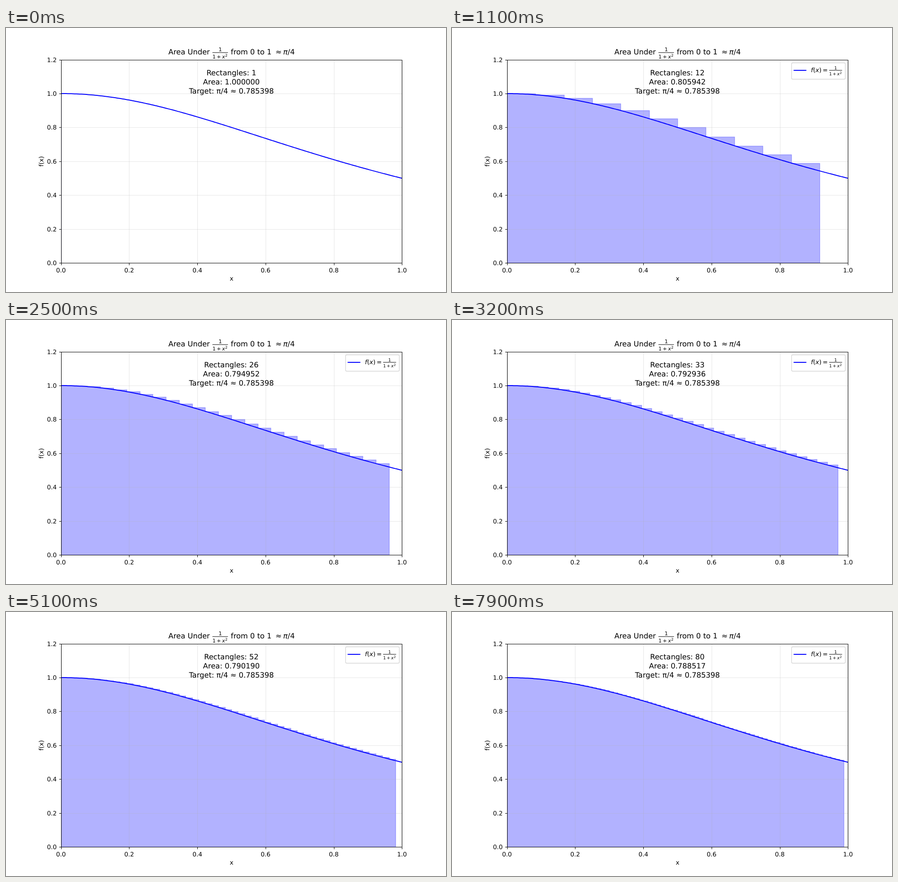
An HTML page for the animation above (8 s loop, 966 by 580 pixels).

```html
<!DOCTYPE html>
<html lang="en">
<head>
<meta charset="utf-8">
<title>Area under a curve</title>
<style>
  html, body { margin: 0; width: 100%; height: 100%; overflow: hidden; background: #fff; }
  svg { display: block; width: 966px; height: 580px; }
  text { font-family: "DejaVu Sans", sans-serif; white-space: pre; text-rendering: geometricPrecision; }
  .it { font-style: oblique; }
</style>
</head>
<body>
<svg id="stage" viewBox="0 0 966 580"></svg>
<script>
const stage = document.getElementById('stage');
const LOOP = 8000, STEP = 100;
const BODY = 13.42, LARGE = 16.1;
const box = { left: 120.75, right: 869.4, top: 69.6, bottom: 516.2 };

const f = x => 1 / (1 + x * x);
const px = x => box.left + x * (box.right - box.left);
const py = y => box.bottom - y / 1.2 * (box.bottom - box.top);
const snap = v => Math.floor(v + 0.5) + 0.5;

function add(tag, attrs, parent = stage) {
  const node = document.createElementNS('http://www.w3.org/2000/svg', tag);
  for (const key in attrs) node.setAttribute(key, attrs[key]);
  return parent.appendChild(node);
}

function label(x, y, size, content, attrs = {}, parent = stage) {
  const node = add('text', { x, y, 'font-size': size, ...attrs }, parent);
  node.textContent = content;
  return node;
}

const middle = { 'text-anchor': 'middle' };
const italic = { class: 'it' };

// Draws 1/(1+x²) with its left edge at x; size is that of the surrounding text.
function fraction(x, baseline, size, parent) {
  const em = size * 0.7, width = size * 2.12;
  const num = baseline - size * 0.45, den = baseline + size * 0.535;
  label(x + width / 2, num, em, '1', middle, parent);
  add('rect', { x, y: Math.round(baseline - size * 0.3) - 0.5, width, height: 1 }, parent);
  label(x, den, em, '1', {}, parent);
  label(x + em * 0.83, den, em, '+', {}, parent);
  label(x + em * 1.865, den, em, 'x', italic, parent);
  label(x + em * 2.49, den - em * 0.383, em * 0.7, '2', {}, parent);
}

// Clip to the plot area
const clip = add('clipPath', { id: 'plot' }, add('defs', {}));
add('rect', { x: 121, y: 70, width: 748, height: 446 }, clip);
const clipped = { 'clip-path': 'url(#plot)' };

// Stepped area
const area = add('path', {
  fill: '#00f', 'fill-opacity': 0.3, stroke: '#00f', 'stroke-opacity': 0.3,
  'stroke-width': 1.34, ...clipped
});

// Grid, ticks and tick labels
const line = (d, stroke, opacity = 1) =>
  add('path', { d, stroke, 'stroke-opacity': opacity, 'stroke-width': 1.07, fill: 'none' });
for (let i = 0; i <= 5; i++) line(`M${snap(px(i / 5))} 70V516`, '#b0b0b0', 0.3);
for (let i = 0; i <= 6; i++) line(`M121 ${snap(py(i / 5))}H869`, '#b0b0b0', 0.3);

// Curve
let curvePath = '';
for (let i = 0; i <= 200; i++) {
  curvePath += `${i ? 'L' : 'M'}${px(i / 200).toFixed(2)} ${py(f(i / 200)).toFixed(2)}`;
}
add('path', { d: curvePath, fill: 'none', stroke: '#00f', 'stroke-width': 2.01, 'stroke-linecap': 'square', ...clipped });

for (let i = 0; i <= 5; i++) {
  const x = px(i / 5);
  line(`M${snap(x)} 516.5v4.7`, '#000');
  label(x, 536.5, BODY, (i / 5).toFixed(1), middle);
}
for (let i = 0; i <= 6; i++) {
  const y = py(i / 5);
  line(`M121.5 ${snap(y)}h-4.7`, '#000');
  label(111.4, Math.round(y + 5), BODY, (i / 5).toFixed(1), { 'text-anchor': 'end' });
}
line('M121.5 70.5H869.5V516.5H121.5Z', '#000');

label(495.1, 554.5, BODY, 'x', middle);
label(0, 0, BODY, 'f(x)', { ...middle, transform: 'translate(81.5 293) rotate(-90)' });

// Title
const titleY = 58;
label(356.6, titleY, LARGE, 'Area Under ');
fraction(453.2, titleY + 0.5, LARGE, stage);
label(488.4, titleY, LARGE, ' from 0 to 1 ');
label(591.8, titleY, LARGE, '≈');
label(608.6, titleY, LARGE, 'π', italic);
label(618.3, titleY, LARGE, '/4');

// Readout
const readout = [104, 124, 144].map(y => label(494.8, y, LARGE, '', middle));
readout[2].textContent = `Target: π/4 ≈ ${(Math.PI / 4).toFixed(6)}`;

// Legend
const legend = add('g', {});
add('rect', {
  x: 745.5, y: 76.5, width: 118, height: 36, rx: 2.7, fill: '#fff', 'fill-opacity': 0.8,
  stroke: '#ccc', 'stroke-opacity': 0.8, 'stroke-width': 1.34
}, legend);
add('path', { d: 'M751 93H777', stroke: '#00f', 'stroke-width': 2.01, 'stroke-linecap': 'square' }, legend);
const legendY = 97;
label(788, legendY, BODY, 'f', italic, legend);
label(792.7, legendY, BODY, '(', {}, legend);
label(798, legendY, BODY, 'x', italic, legend);
label(805.9, legendY, BODY, ')', {}, legend);
label(813.7, legendY, BODY, '=', {}, legend);
fraction(828, legendY, BODY, legend);

function render(time) {
  const count = Math.floor((time % LOOP) / STEP) + 1;
  let sum = 0, d = `M${snap(px(0))} ${snap(py(0))}`;
  for (let i = 0; i < count; i++) {
    const y = f(i / count);
    sum += y / count;
    d += `V${snap(py(y))}`;
    if (i < count - 1) d += `H${snap(px((i + 1) / count))}`;
  }
  area.setAttribute('d', `${d}V${snap(py(0))}Z`);
  readout[0].textContent = `Rectangles: ${count}`;
  readout[1].textContent = `Area: ${sum.toFixed(6)}`;
  legend.setAttribute('visibility', count > 1 ? 'visible' : 'hidden');
}

const start = performance.now();
function tick() {
  render(performance.now() - start);
  requestAnimationFrame(tick);
}
tick();
</script>
</body>
</html>
```
